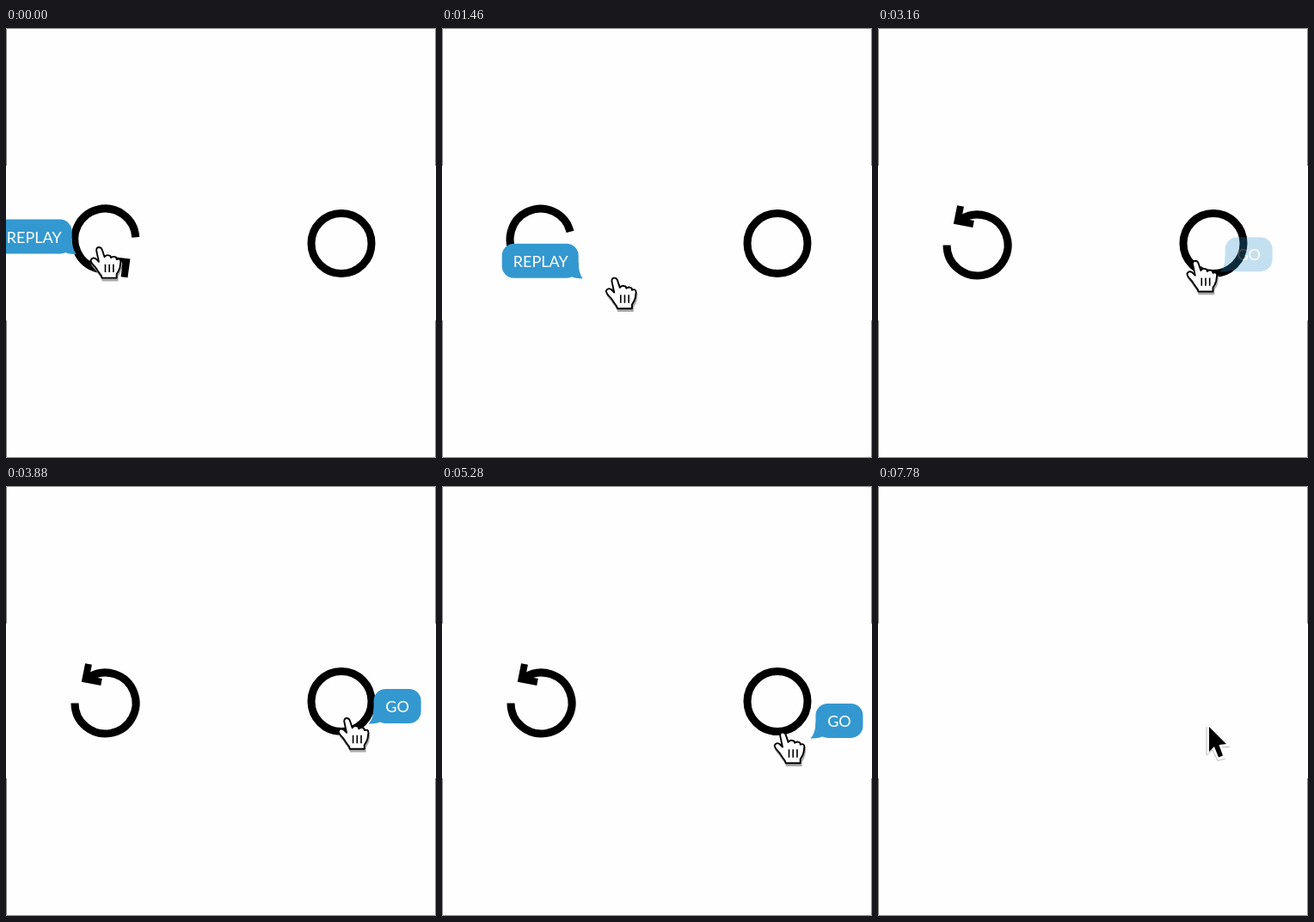
Animation of 500x500 px, one loop 7.8 s. Source, as an HTML page:

```html
<!DOCTYPE html>
<html lang="en">
<head>
<meta charset="utf-8">
<title>Icon tooltips</title>
<style>
  html, body { margin: 0; width: 100%; height: 100%; overflow: hidden; background: #fefefe; }
  svg { display: block; width: 100vw; height: 100vh; }
  .line { fill: none; stroke: #000; stroke-width: 9; }
  .frame { fill: none; stroke: #888; }
  .bubble { fill: #3498d0; }
  .bubble text { font: 18px Lato, "Open Sans", sans-serif; fill: #fff; text-anchor: middle; }
</style>
</head>
<body>
<svg viewBox="0 0 500 500">
  <defs>
    <clipPath id="band"><rect y="160" width="500" height="180"/></clipPath>
    <path id="palm" d="M-3 4Q-3 0 0 0Q3 0 4 3L7 12Q9 9 12 10Q15 10 15 13Q18 11 20 12Q22 12 22 15Q27 13 27 18L26 25Q25 29 22 33V38H4L3 35Q-1 30 -4 25Q-10 19 -10 16Q-8 12 -4 14L0 18Z"/>
  </defs>

  <path class="frame" d="M.5 160V.5H499.5V160M.5 340V499.5H499.5V340"/>

  <g clip-path="url(#band)">
    <g id="icons">
      <!-- replay arrow, drawn around its pivot -->
      <g id="replay">
        <path class="line" d="M-35.5 3.5A35.5 35.5 0 1 0 -18.8 -26.600"/>
        <path class="line" style="stroke-width:8" d="M-19.5 -42L-23 -24.5L-4.5 -21"/>
      </g>
      <circle class="line" cx="390" cy="250.5" r="35"/>
    </g>

    <!-- bubbles have their tail tip at the local zero point -->
    <g id="replayTip" class="bubble">
      <rect x="-94" y="-40" width="89" height="40" rx="14"/>
      <path d="M-5 -18Q-5 -6 0 .5Q-9 1 -16 -3Z"/>
      <text x="-49" y="-13">REPLAY</text>
    </g>
    <g id="goTip" class="bubble">
      <rect x="6" y="-40" width="55" height="40" rx="14"/>
      <path d="M6 -18Q6 -6 0 .5Q9 1 17 -3Z"/>
      <text x="33.5" y="-13">GO</text>
    </g>

    <g id="hand">
      <use href="#palm" x="1" y="3" fill="#aaa" stroke="#aaa" stroke-width="2"/>
      <use href="#palm" fill="#fff" stroke="#000" stroke-width="2" stroke-linejoin="round"/>
      <path d="M8 21V31M13 21V31M18 21V31" stroke="#000" stroke-width="1.7"/>
    </g>
    <g id="arrow">
      <path d="M382 280V313L389 307L395 319.5L404 317M400 303.5H409" fill="none" stroke="#bbb"/>
      <path d="M385 280V309L391 303L396 315.5L401 313.5L396.5 301L405 300Z"/>
    </g>
  </g>
</svg>
<script>
const LOOP = 7800, RESET = 7770, LAG = 90, TURN = 912;
const el = id => document.getElementById(id);

const ramp = (t, from, to) => Math.min(1, Math.max(0, (t - from) / (to - from)));
const smooth = u => u * u * (3 - 2 * u);

// Symmetric ease that swings back first and overshoots at the end.
function back(u) {
  if (u > 0.5) return 1 - back(1 - u);
  const v = 2 * u, pull = 3.6;
  return v * v * ((pull + 1) * v - pull) / 2;
}
const turn = (t, from) => back(ramp(t, from, from + TURN));

// Mouse strokes: start, end, dx, dy. Each one eases in and out.
const HOME = { x: 114, y: 259.5 };
const strokes = [
  [-150, 150, -12, -9],    // settle on the left icon
  [300, 1600, 101, 39.5],  // drift away from it
  [1440, 1640, 15, 60],    // leave through the bottom
  [1700, 2500, 125, 0],    // pass by unseen
  [2500, 3200, 26, -80],   // come up to the right icon
  [3300, 4200, 38, 0],     // circle its lower edge
  [4200, 5100, -9, 17],
  [5100, 6000, -19, -4]
];

function cursor(t) {
  let { x, y } = HOME;
  for (const [from, to, dx, dy] of strokes) {
    const s = smooth(ramp(t, from, to));
    x += s * dx;
    y += s * dy;
  }
  return { x, y };
}

function place(id, { x, y }, dx, dy, opacity, more = "") {
  el(id).setAttribute("transform", `translate(${x + dx} ${y + dy}) ${more}`);
  el(id).setAttribute("opacity", opacity);
}

function draw(t) {
  const on = t < RESET ? 1 : 0;
  const late = t - LAG;
  const angle = -180 * (turn(t, -860) - turn(t, 1345));
  place("replay", { x: 115.5, y: 249 }, 0, 0, 1, `rotate(${angle})`);
  place("hand", cursor(t), 0, 0, on, "scale(.94)");
  place("replayTip", cursor(Math.min(late, 1450)), -31, 4, on * (1 - ramp(t, 1470, 1640)));
  place("goTip", cursor(late), 31, 6, on * ramp(t, 3130, 3240));
  el("icons").setAttribute("opacity", on);
  el("arrow").setAttribute("opacity", 1 - on);
}

const start = performance.now();
function tick() {
  draw((performance.now() - start) % LOOP);
  requestAnimationFrame(tick);
}
tick();
</script>
</body>
</html>
```
